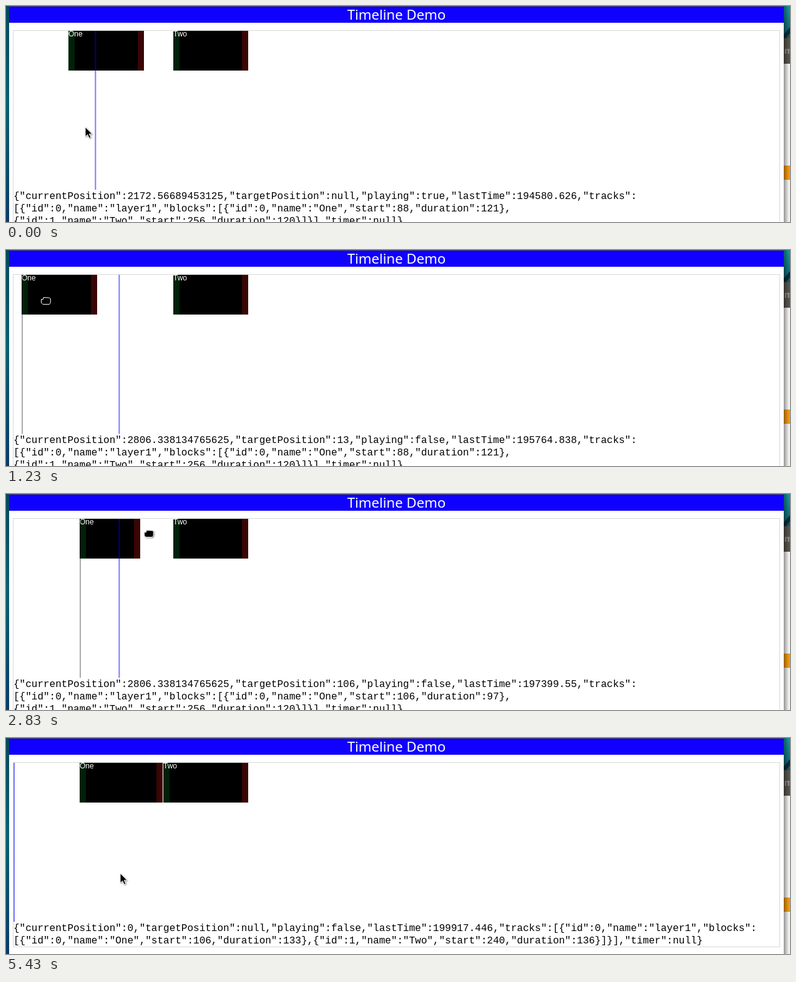
An HTML page for the animation above (6360 ms loop, 1256 px wide and 348 px high).

```html
<!DOCTYPE html>
<html lang="en">
<head>
<meta charset="utf-8">
<title>Timeline Demo</title>
<style>
  html, body { margin: 0; width: 100%; height: 100%; overflow: hidden; background: #fff; }
  svg { display: block; }
  rect { shape-rendering: crispEdges; }
  #playhead { shape-rendering: auto; }
  .title { font: 22.2px "Noto Sans", "Open Sans", sans-serif; fill: #fff; text-anchor: middle; }
  .json { font: 16px "Liberation Mono", monospace; fill: #000; }
  .label { font: 12px "Liberation Sans", Arial, sans-serif; fill: #fff; }
  .tab { font: bold 14px "Open Sans", sans-serif; fill: #96928a; }
  #cursor { filter: drop-shadow(1px 1.5px 1px rgba(0, 0, 0, .45)); }
</style>
</head>
<body>
<svg width="1256" height="348" viewBox="0 0 1256 348">
  <defs>
    <linearGradient id="desk" x2="0" y2="1">
      <stop offset="0" stop-color="#07485a"/>
      <stop offset=".45" stop-color="#046070"/>
      <stop offset="1" stop-color="#0b3a66"/>
    </linearGradient>
    <linearGradient id="glow" x2="0" y2="1">
      <stop offset="0" stop-color="#1595a2"/>
      <stop offset="1" stop-color="#0d5a66"/>
    </linearGradient>
    <linearGradient id="shade">
      <stop offset="0" stop-color="#000" stop-opacity=".38"/>
      <stop offset="1" stop-color="#000" stop-opacity="0"/>
    </linearGradient>
  </defs>

  <!-- desktop behind the window -->
  <rect width="6" height="348" fill="url(#desk)"/>
  <rect x="1246" width="10" height="52" fill="url(#glow)"/>
  <path d="M1246 46L1256 34V44L1249 52H1246Z" fill="#082c36"/>
  <rect x="1246" y="52" width="10" height="41" fill="#57534c"/>
  <text class="tab" x="1238" y="77">om</text>
  <rect x="1246" y="93" width="10" height="255" fill="#f2f1f0"/>
  <rect x="1246" y="257" width="10" height="23" fill="#f0980f"/>
  <rect x="1246" width="8" height="348" fill="url(#shade)"/>

  <!-- window -->
  <rect x="5" width="1241" height="348" fill="#fff"/>
  <rect x="5" width="1241" height="1" fill="#55544a"/>
  <rect x="5" y="1" width="1241" height="26" fill="#1000ff"/>
  <text class="title" x="625.5" y="22">Timeline Demo</text>
  <rect id="panel" x="11.5" y="39.5" width="1228" fill="none" stroke="#d8d8d8"/>

  <g id="blocks"></g>
  <rect id="target" y="40" width="2" height="256" fill="#000" opacity=".33"/>
  <rect id="playhead" y="40" width="2" height="256" fill="#00f" opacity=".52"/>
  <g id="json"></g>

  <g id="cursor" stroke-linejoin="round">
    <path id="arrow" d="M0 0V15.5L3.6 12.2L6.2 18L8.8 16.8L6.3 11.2H11Z" fill="#000" stroke="#fff"/>
    <path id="hand" fill="#fff" stroke="#000" stroke-width=".7"
      d="M-9-1C-9-3-7-3-6-1.5L-4.5 .5L-5.5-6C-5.3-8-3.3-8-2.8-6L-2-3L-1.2-8C-.6-9.3 1-9.3 1.3-8L1.5-3L3-7.5C3.8-9 5.6-8.3 5.3-6.7L4.5-2L6.5-5C7.8-6 9-5 8.4-3.5L6.3 3L4.5 9H-3.5L-6 4.5Z"/>
    <path id="fist" fill="#000" stroke="#fff"
      d="M-7.5-2.5H-4.5L-4-5.5L5.5-5L7.5-3.5L7 3.5L5.5 5.5H-5L-7.5 3Z"/>
  </g>
</svg>

<script>
const LOOP = 6360, LEFT = 12, BOTTOM = 104;
const PLAY_TIME = 600, RESET = 5400, RESET_CLOCK = 5336.82;
const START_POS = 2172.56689453125, STOP_POS = 2806.338134765625;
const START_CLOCK = 194580.626, CLOCK_RATE = .9960862;
const $ = id => document.getElementById(id);

// Pointer gestures: from, to, end x, end y, what is held. The next free gesture lets go.
const gestures = [
  [0, 600, 146, 99],
  [640, 740, 139, 91],
  [740, 1188.865, 64, 82, "move"],
  [1270, 1500, 157, 79, "move"],
  [1500, 1850, 236, 63],
  [1930, 1970, 240, 63, "hold"],
  [2320, 2400, 253, 63, "hold"],
  [2400, 2700, 203, 65, "resize"],
  [2730, 3150, 265, 63, "resize"],
  [3150, 3230, 275, 62],
  [3630, 4035.623, 259, 62, "trim"],
  [4040, 4170, 283, 137],
  [4490, 4630, 158, 183],
  [4730, 4830, 183, 216],
  [4960, 5000, 183, 218]
];

const easeOut = u => 1 - (1 - u) ** 2;

// Plays the gestures up to t, adding up how far each held thing was dragged.
function replay(t) {
  const p = { x: 127, y: 195, held: null, busy: 0, move: 0, resize: 0, trim: 0 };
  for (const [from, to, x, y, held] of gestures) {
    if (t < from) break;
    const f = easeOut(Math.min((t - from) / (to - from), 1));
    const dx = (x - p.x) * f;
    p.x += dx;
    p.y += (y - p.y) * f;
    p.held = held || null;
    if (held in p) p[held] += dx;
    if (y < BOTTOM) p.busy = Math.min(t, to);
  }
  return p;
}

function stateAt(t) {
  const p = replay(t), playing = t < 640;
  const played = (STOP_POS - START_POS) * Math.min(t / PLAY_TIME, 1);
  const clock = playing ? played : t >= RESET ? RESET_CLOCK : p.busy * CLOCK_RATE;
  const shownStart = Math.round(88 + p.move), twoStart = Math.round(256 + p.trim);
  const targets = { move: shownStart, hold: shownStart, resize: shownStart, trim: twoStart };
  return {
    pointer: p,
    position: t >= RESET ? 0 : Math.round((START_POS + played) * 4096) / 4096,
    target: p.held ? targets[p.held] : null,
    playing,
    lastTime: Number((START_CLOCK + clock).toFixed(3)),
    shownStart,
    one: { id: 0, name: "One", start: p.held === "move" ? 88 : shownStart, duration: Math.round(121 + p.resize) },
    two: { id: 1, name: "Two", start: twoStart, duration: 376 - twoStart }
  };
}

function set(el, attrs) {
  for (const name in attrs) el.setAttribute(name, attrs[name]);
}
function add(parent, tag, attrs) {
  const el = document.createElementNS("http://www.w3.org/2000/svg", tag);
  set(el, attrs);
  return parent.appendChild(el);
}

function makeBlock(name) {
  const bar = (width, fill) => add($("blocks"), "rect", { y: 40, width, height: 64, fill });
  const body = bar(0, "#000"), head = bar(10, "#002108"), tail = bar(10, "#390505");
  const label = add($("blocks"), "text", { class: "label", y: 49 });
  label.textContent = name;
  return (start, duration) => {
    const x = LEFT + start;
    set(body, { x, width: duration });
    set(head, { x });
    set(tail, { x: x + duration - 10 });
    set(label, { x });
  };
}
const placeOne = makeBlock("One"), placeTwo = makeBlock("Two");
const rows = [0, 1, 2].map(i => add($("json"), "text", { class: "json", x: LEFT, y: 311 + i * 20 }));

function wrap(parts, limit) {
  const lines = [""];
  for (const part of parts) {
    const last = lines.length - 1;
    if (lines[last] && lines[last].length + part.length > limit) lines.push(part);
    else lines[last] += part;
  }
  return lines;
}

function showJson(s) {
  const lines = wrap([
    `{"currentPosition":${s.position},"targetPosition":${s.target},"playing":${s.playing},"lastTime":${s.lastTime},"tracks":`,
    '[{"id":0,"name":"layer1","blocks":',
    `[${JSON.stringify(s.one)},`,
    `${JSON.stringify(s.two)}]}],"timer":null}`
  ], 127);
  rows.forEach((row, i) => { row.textContent = lines[i] || ""; });
  set($("panel"), { height: 257 + lines.length * 20 });
}

function showCursor(s) {
  const { x, y, held } = s.pointer;
  const over = (start, duration) => y < BOTTOM && x >= LEFT + start && x < LEFT + start + duration;
  const hovering = over(s.shownStart, s.one.duration) || over(s.two.start, s.two.duration);
  const kind = held ? "fist" : hovering ? "hand" : "arrow";
  for (const id of ["arrow", "hand", "fist"]) set($(id), { display: id === kind ? "inline" : "none" });
  set($("cursor"), { transform: `translate(${Math.round(x)} ${Math.round(y)})` });
}

// Screen updates come 30 times a second, on a 10 ms grid.
function snap(t) {
  const at = k => Math.round(k * 10 / 3) * 10;
  let k = Math.floor(t * .03) + 1;
  while (at(k) > t) k--;
  return at(k);
}

function draw(time) {
  const s = stateAt(snap(time % LOOP));
  placeOne(s.shownStart, s.one.duration);
  placeTwo(s.two.start, s.two.duration);
  set($("playhead"), { x: LEFT + s.position * .06 });
  set($("target"), { x: LEFT + (s.target || 0), display: s.target === null ? "none" : "inline" });
  showJson(s);
  showCursor(s);
}

const begin = performance.now();
function tick() {
  draw(performance.now() - begin);
  requestAnimationFrame(tick);
}
tick();
</script>
</body>
</html>
```
